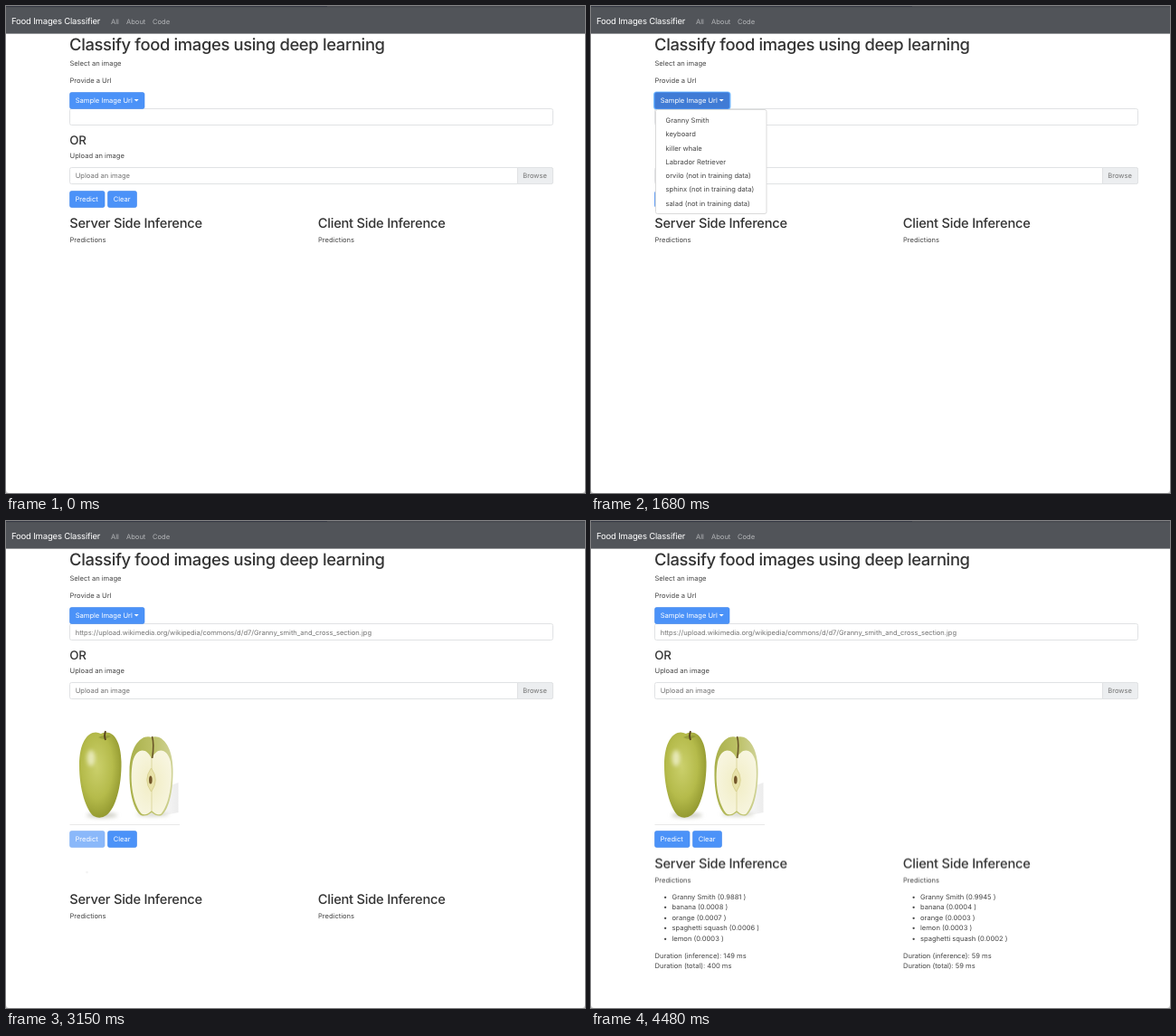
Write an HTML page that moves like this. It is 640 px wide and 538 px high and loops after 4550 ms.

```html
<!DOCTYPE html>
<html lang="en">
<head>
<meta charset="utf-8">
<title>Food Images Classifier</title>
<style>
html, body { margin: 0; width: 100%; height: 100%; overflow: hidden; background: #fff; }
svg { display: block; width: 640px; height: 538px; }
text { font: 400 7.57px Inter, "Open Sans", sans-serif; fill: #444; text-rendering: geometricPrecision; white-space: pre; }
.h1, .h2, .h3 { font-weight: 480; fill: #333; letter-spacing: -.019em; }
.h1 { font-size: 18.4px; }
.h2 { font-size: 14.65px; letter-spacing: -.015em; }
.h3 { font-size: 13.3px; letter-spacing: -.01em; }
.brand { font-size: 9.5px; fill: #fff; letter-spacing: -.019em; }
.nav { fill: #b4b6b9; }
.white { fill: #fff; }
.muted { fill: #737373; }
#url { font-size: 7.54px; }
.field { fill: #fff; stroke: #e0e2e4; }
.btn { fill: #4b92f8; stroke: #4288ec; stroke-width: .6; }
#spin { transform-box: fill-box; transform-origin: center; }
</style>
</head>
<body>
<svg viewBox="0 0 640 538" xmlns="http://www.w3.org/2000/svg">
  <defs>
    <radialGradient id="skin" cx=".42" cy=".4" r=".62">
      <stop offset="0" stop-color="#cbd06c"/>
      <stop offset=".6" stop-color="#b5bb4b"/>
      <stop offset="1" stop-color="#92982f"/>
    </radialGradient>
    <radialGradient id="flesh" cx=".5" cy=".5" r=".6">
      <stop offset="0" stop-color="#f1edc4"/>
      <stop offset="1" stop-color="#f8f6e2"/>
    </radialGradient>
    <linearGradient id="rind" x2="1">
      <stop offset="0" stop-color="#a9b04b"/>
      <stop offset=".5" stop-color="#bbc064"/>
      <stop offset="1" stop-color="#d0d398"/>
    </linearGradient>
    <linearGradient id="table" x2="1">
      <stop offset="0" stop-color="#eee" stop-opacity="0"/>
      <stop offset="1" stop-color="#ececec"/>
    </linearGradient>
    <filter id="soft" x="-30%" y="-80%" width="160%" height="260%"><feGaussianBlur stdDeviation="2"/></filter>
    <filter id="blur" x="-50%" y="-50%" width="200%" height="200%"><feGaussianBlur stdDeviation=".5"/></filter>
  </defs>

  <rect width="640" height="30.6" fill="#515459"/>
  <rect width="640" height="1.5" fill="#484a50"/>
  <rect width="355" height="1" fill="#373a45"/>
  <path d="M0 534v4h4q-4 0-4-4zM640 534v4h-4q4 0 4-4z" fill="#ccc"/>

  <g id="page">
    <rect class="field" x="70.5" y="113.5" width="534" height="18" rx="2"/>
    <rect class="field" x="70.5" y="178.5" width="534" height="18" rx="2"/>
    <path d="M565.5 178.5h37q2 0 2 2v14q0 2-2 2h-37z" fill="#eceef0" stroke="#e0e2e4"/>
    <rect id="ring" x="69" y="94.5" width="85.5" height="20" rx="3.5" fill="#79bdff" filter="url(#blur)"/>
    <rect id="sample" class="btn" x="70.5" y="95.5" width="82.5" height="18" rx="2"/>
    <path d="M141.7 103h5l-2.5 2.6z" fill="#fff"/>
  </g>

  <g id="photo">
    <path d="M160 300L190.5 289V322L160 328z" fill="url(#table)"/>
    <path d="M70.5 335.5H192" stroke="#e9e9e9"/>
    <ellipse cx="106" cy="325" rx="17" ry="3" fill="#ccccc2" filter="url(#soft)"/>
    <ellipse cx="162" cy="324" rx="18" ry="2.5" fill="#d6d6cc" filter="url(#soft)"/>
    <path d="M105 235C94 229 81 240 81 270C81 297 89 320 97 326Q104 330 111 325C121 318 128 293 127.5 266C127 241 117 229 105 235Z" fill="url(#skin)"/>
    <ellipse cx="94" cy="262" rx="4.5" ry="9" fill="#f0f1cd" opacity=".8" filter="url(#soft)"/>
    <path d="M102 239q6 4 14-1-7-3-14 1z" fill="#7d862c" opacity=".5"/>
    <path d="M110 242Q108 237 110 232" fill="none" stroke="#58431f" stroke-width="1.8"/>
    <path d="M161 239C150 235 137 248 136.5 276C136 300 141 319 149 325Q155 327 161 322Q167 327 172 325C180 319 185 298 184.5 274C184 248 172 235 161 239Z" fill="url(#rind)"/>
    <path d="M161 263C156 250 144 250 140 266C136 288 141 314 150 323.5Q155 326 161 320Q167 326 171.500 323.500C180 314 185 288 182 266C178 250 166 250 161 263Z" fill="url(#flesh)"/>
    <path d="M161 263V320" stroke="#ddd8a0" stroke-width="1"/>
    <path d="M160.5 273Q151 286 160.5 299Q170 286 160.5 273Z" fill="#e8e2a9" stroke="#d2ca86" stroke-width=".7"/>
    <ellipse cx="159.8" cy="286" rx="1.8" ry="4.6" fill="#73562a"/>
    <path d="M161.7 262Q164 246 161.5 238" fill="none" stroke="#695528" stroke-width="1.6"/>
  </g>

  <g id="actions">
    <g id="predictBox"><rect id="predict" class="btn" x="70.5" y="204.5" width="38.5" height="18" rx="2"/></g>
    <rect id="clear" class="btn" x="112.5" y="204.5" width="32" height="18" rx="2"/>
  </g>
  <circle id="spin" cx="89.5" cy="388" r="19" fill="#4b4c50"/>
  <g id="heads"></g>
  <g id="results"></g>
  <g id="menu"><rect x="71.5" y="114.5" width="122.5" height="115" rx="2" fill="#fff" stroke="#dadada"/></g>
</svg>
<script>
const LOOP = 4550;
const $ = id => document.getElementById(id);

// y is the middle of a body line; headings pass their own drop to the baseline
function label(parent, x, y, str, cls = '', drop = 2.7, id) {
  const el = document.createElementNS('http://www.w3.org/2000/svg', 'text');
  el.setAttribute('x', x);
  el.setAttribute('y', y + drop);
  el.setAttribute('class', cls);
  if (id) el.id = id;
  el.textContent = str;
  $(parent).append(el);
}

label('page', 6, 17, 'Food Images Classifier', 'brand', 3.4);
[[116, 'All'], [133, 'About'], [162, 'Code']].forEach(([x, s]) => label('page', x, 17, s, 'nav'));
label('page', 70, 43, 'Classify food images using deep learning', 'h1', 6);
label('page', 70.5, 63, 'Select an image');
label('page', 70.5, 82, 'Provide a Url');
label('page', 76.7, 104.5, 'Sample Image Url', 'white');
label('page', 76.7, 122.8,
  'https://upload.wikimedia.org/wikipedia/commons/d/d7/Granny_smith_and_cross_section.jpg', 'muted', 2.7, 'url');
label('page', 70.3, 148, 'OR', 'h3', 4.8);
label('page', 70.5, 165, 'Upload an image');
label('page', 76.7, 187.6, 'Upload an image', 'muted');
label('page', 571.3, 187.6, 'Browse', 'muted');
label('predictBox', 76.5, 213.4, 'Predict', 'white');
label('actions', 118.7, 213.4, 'Clear', 'white');

['Granny Smith', 'keyboard', 'killer whale', 'Labrador Retriever', 'orvilo (not in training data)',
 'sphinx (not in training data)', 'salad (not in training data)']
  .forEach((s, i) => label('menu', 82.6, 126.5 + i * 15.25, s));

function column(x, title, scores, times) {
  label('heads', x - .3, 240, title, 'h2', 5);
  label('heads', x, 258, 'Predictions');
  scores.forEach(([name, p], i) => {
    const y = 415.2 + i * 11.45;
    label('results', x + 9.5, y, '•');
    label('results', x + 19, y, `${name} (${p} )`);
  });
  label('results', x, 480.2, `Duration (inference): ${times[0]} ms`);
  label('results', x, 491.6, `Duration (total): ${times[1]} ms`);
}
column(70.5, 'Server Side Inference',
  [['Granny Smith', '0.9881'], ['banana', '0.0008'], ['orange', '0.0007'], ['spaghetti squash', '0.0006'], ['lemon', '0.0003']],
  [149, 400]);
column(345, 'Client Side Inference',
  [['Granny Smith', '0.9945'], ['banana', '0.0004'], ['orange', '0.0003'], ['lemon', '0.0003'], ['spaghetti squash', '0.0002']],
  [59, 59]);

function play(id, prop, steps) {
  const all = [[0, steps[0][1]], ...steps, [LOOP, steps[steps.length - 1][1]]];
  $(id).animate(all.map(([t, v]) => ({ offset: t / LOOP, [prop]: v })), { duration: LOOP, iterations: Infinity });
}
// hard cuts: start value, then [time, value] pairs
function cut(id, prop, first, ...cuts) {
  let last = first;
  const steps = [[0, first]];
  for (const [t, v] of cuts) {
    steps.push([t, last], [t, v]);
    last = v;
  }
  play(id, prop, steps);
}
const fade = (id, prop, from, to, start, end, len = 140) =>
  play(id, prop, [[start, from], [start + len, to], [end, to], [end + len, from]]);

const OPEN = 1255, PICK = 1815, LOADED = 1885, ASK = 3126, DONE = 3565;
const BLUE = '#4b92f8', DARK = '#407bd5';
const down = y => `translate(0px, ${y}px)`;

fade('clear', 'fill', BLUE, '#4485ea', 520, 985);
fade('sample', 'fill', BLUE, DARK, 1110, 2310);
fade('ring', 'opacity', 0, 1, OPEN, PICK);
cut('menu', 'opacity', 0, [OPEN, 1], [PICK, 0]);
cut('url', 'opacity', 0, [PICK, 1]);
cut('photo', 'opacity', 0, [LOADED, 1]);
cut('actions', 'transform', down(0), [LOADED, down(138)]);
cut('heads', 'transform', down(0), [LOADED, down(138.5)], [ASK, down(178)], [DONE, down(138.5)]);
cut('predictBox', 'opacity', 1, [ASK, .65], [DONE, 1]);
cut('results', 'opacity', 0, [DONE, 1]);
play('spin', 'transform', [[ASK, 'scale(0)'], [ASK + 375, 'scale(1)']]);
play('spin', 'opacity', [[ASK, 0], [ASK + 375, 1], [DONE, .83], [DONE, 0]]);
</script>
</body>
</html>
```
